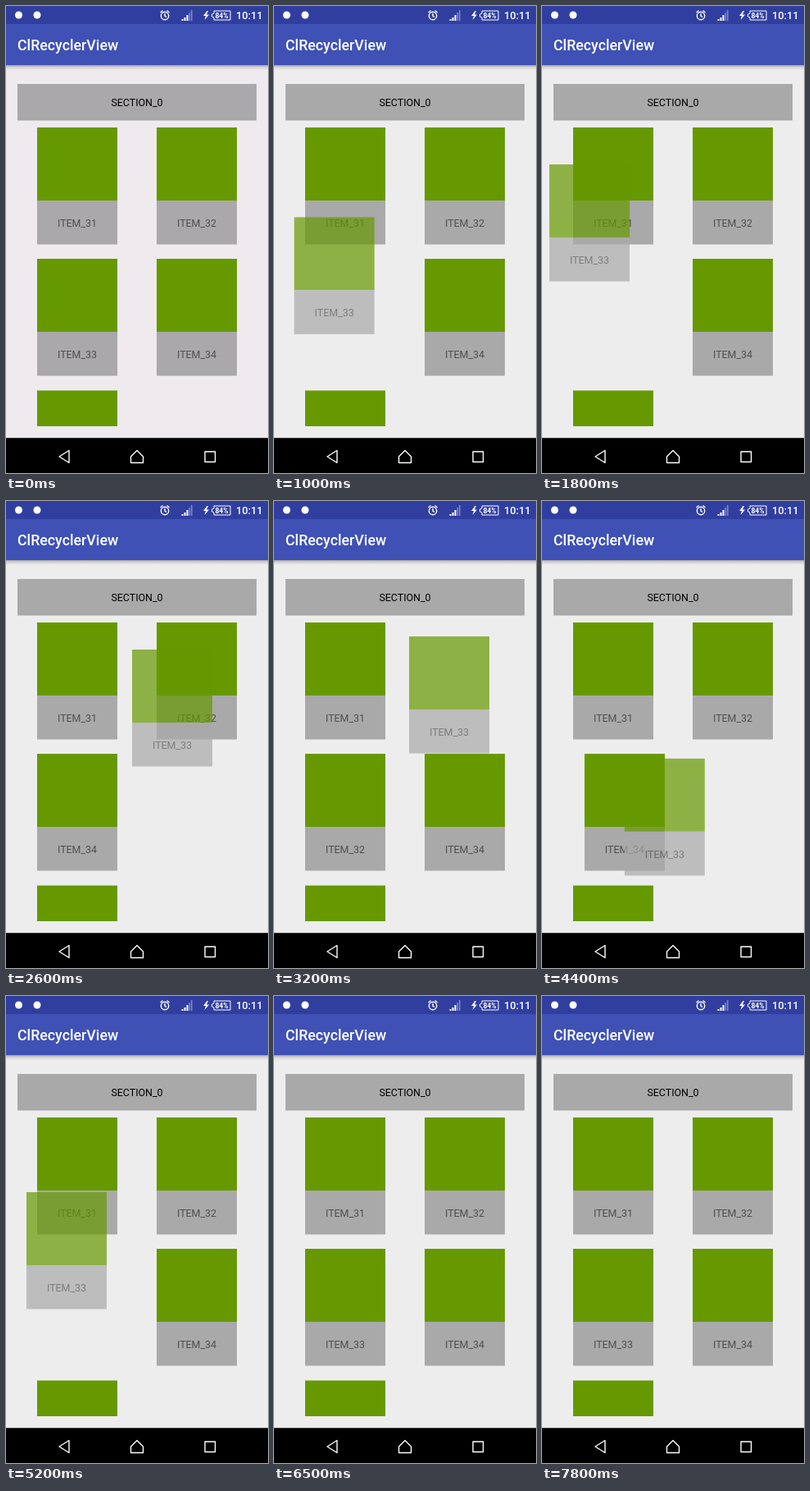
Recreate the animation shown at these times as an HTML page. Size 320 px wide and 569 px high, loop 8000 ms.

```html
<!DOCTYPE html>
<html lang="en">
<head>
<meta charset="utf-8">
<title>Drag to reorder</title>
<style>
  html, body { margin: 0; width: 100%; height: 100%; overflow: hidden; background: #000; }
  svg { display: block; width: 100%; height: 100%; font-family: Roboto, sans-serif; }
  svg { --page: #ededed; --grey: #a9a9a9; }
  svg.warm { --page: #eeeaee; --grey: #aaa8ab; }
  .page { fill: var(--page); }
  .grey { fill: var(--grey); }
  .label { font-size: 12.44px; text-anchor: middle; }
  .line { fill: none; stroke: #fff; stroke-width: 1.4; stroke-linejoin: round; }
</style>
</head>
<body>
<svg id="stage" viewBox="0 0 320 569">
  <defs>
    <linearGradient id="shade" x2="0" y2="1">
      <stop offset="0" stop-opacity=".32"/>
      <stop offset=".4" stop-opacity=".12"/>
      <stop offset="1" stop-opacity="0"/>
    </linearGradient>
  </defs>

  <rect class="page" width="320" height="569"/>
  <rect class="grey" x="14" y="95" width="292" height="44.5"/>
  <text class="label" x="160" y="122">SECTION_0</text>
  <rect x="38" y="468.5" width="98" height="43.5" fill="#690"/>
  <g id="items"></g>

  <rect y="72" width="320" height="6" fill="url(#shade)"/>
  <rect y="22" width="320" height="50" fill="#3f51b5"/>
  <text x="14" y="54" fill="#fff" font-size="17.8" font-weight="500">ClRecyclerView</text>

  <rect width="320" height="22" fill="#303f9f"/>
  <g fill="#fff">
    <circle cx="15.5" cy="11" r="4.5"/>
    <circle cx="38" cy="11" r="4.5"/>
    <path d="M214.5 18v-2h2v2zM217.5 18v-4h2v4zM220.5 18v-7h2v7z"/>
    <path d="M223.5 18V8H225v10zM226 18V5h1.5v13z" opacity=".4"/>
    <path d="M245.5 6l-4.500 6h3l-1.500 5 5.500-6.500h-3.200l2.200-4.500z"/>
    <text x="263.5" y="14.6" font-size="8.5" font-weight="700" text-anchor="middle">84%</text>
    <text x="281" y="16" font-size="12.8" font-weight="500">10:11</text>
  </g>
  <g class="line">
    <circle cx="194" cy="12" r="4.7"/>
    <path d="M194 9v3.2l2 1.300M188.500 8l3-2.500M199.500 8l-3-2.500"/>
    <path d="M254 6h20v11h-20v-3l-2.500-1v-3l2.500-1z" style="stroke-width: 1"/>
  </g>

  <rect y="526.3" width="320" height="43"/>
  <g class="line">
    <path d="M77 541.500v15l-12-7.500z"/>
    <path d="M152.500 549l7.500-7.500 7.500 7.500v7.500h-15z"/>
    <rect x="243" y="543" width="12.500" height="12.500"/>
  </g>
</svg>
<script>
const LOOP = 8000, STEP = 100, MOVE = 250;

// The slot left free for the dragged item, as [time, slot]
const gaps = [[0, 2], [2150, 3], [2800, 1], [3533, 3], [4350, 2]];

// Turning points of the finger, as [time, x, y]
const drag = [
  [600, 38, 308], [1500, 8, 194], [1800, 9, 193], [2250, 145, 258],
  [2600, 154, 181], [3200, 165, 165], [3700, 133, 247], [4350, 115, 314],
  [4650, 30, 313], [4950, 8, 280], [5200, 25, 239], [5700, 21, 152],
  [5900, 22, 152], [6450, 38, 308]
];

const mix = (a, b, p) => a + (b - a) * p;
const ease = p => (1 - Math.cos(Math.PI * Math.min(1, p))) / 2;
const slotAt = i => [38 + 146 * (i % 2), 148 + 160 * Math.floor(i / 2)];

// Resting items fill the slots in order and skip the gap
function restAt(index, t) {
  let pos;
  for (const [start, gap] of gaps) {
    if (t < start) break;
    const goal = slotAt(index + (index >= gap));
    const p = ease((t - start) / MOVE);
    pos = pos ? pos.map((v, k) => mix(v, goal[k], p)) : goal;
  }
  return pos;
}

function dragAt(t) {
  const i = drag.findIndex(key => key[0] > t);
  if (i < 1) return null;
  const [t0, x0, y0] = drag[i - 1], [t1, x1, y1] = drag[i];
  const p = (t - t0) / (t1 - t0);
  return [mix(x0, x1, p), mix(y0, y1, p)];
}

function makeItem(name) {
  const g = document.createElementNS("http://www.w3.org/2000/svg", "g");
  g.innerHTML = `<rect width="98" height="89" fill="#690"/>
    <rect class="grey" y="89" width="98" height="53.5"/>
    <text class="label" x="49" y="121" fill="#4e4e4e">${name}</text>`;
  document.getElementById("items").append(g);
  return g;
}

const stage = document.getElementById("stage");
const resting = ["ITEM_31", "ITEM_32", "ITEM_34"].map(makeItem);
const held = makeItem("ITEM_33");

const place = (g, [x, y]) => g.setAttribute("transform", `translate(${x} ${y})`);

function render(t) {
  stage.classList.toggle("warm", t < 500);
  resting.forEach((g, i) => place(g, restAt(i, t)));
  const pos = dragAt(t);
  place(held, pos || slotAt(2));
  held.setAttribute("opacity", pos ? 0.7 : 1);
}

const begin = performance.now();
function tick() {
  const t = (performance.now() - begin) % LOOP;
  render(Math.floor(t / STEP) * STEP);
  requestAnimationFrame(tick);
}
tick();
</script>
</body>
</html>
```
